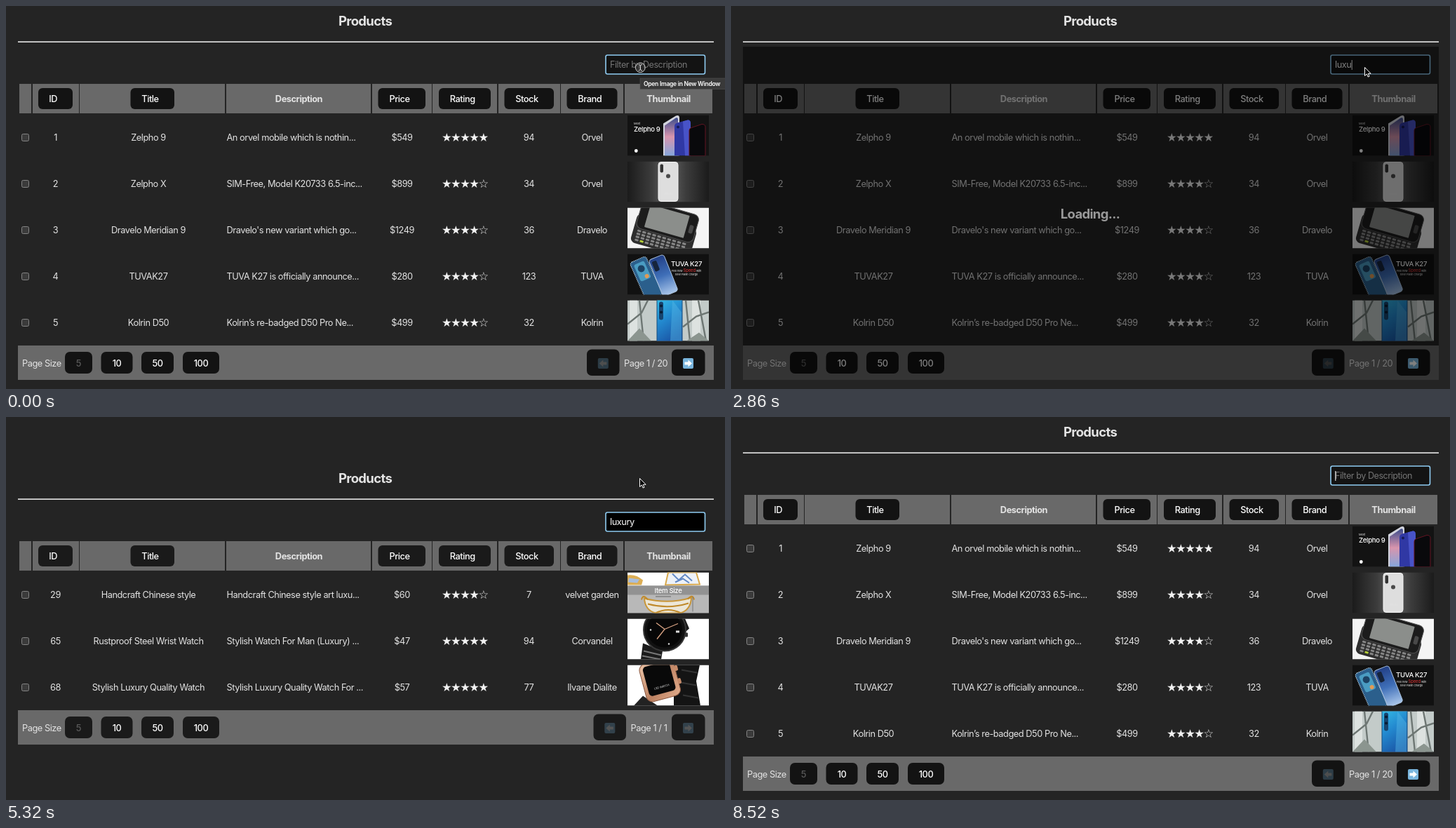
These frames come from a looping animation (1025x546 px, 8630 ms). An HTML page:

```html
<!DOCTYPE html>
<html lang="en">
<head>
<meta charset="utf-8">
<title>Products</title>
<style>
  html, body { margin: 0; width: 100%; height: 100%; overflow: hidden; background: #242424; }
  svg { display: block; }
  #stage { width: 100vw; height: 100vh; }
  text { font: 12.8px Inter, Roboto, sans-serif; letter-spacing: -.036em; fill: #e3e3e3; white-space: pre; }
  .mid { text-anchor: middle; }
  .button { font-weight: 500; fill: #fff; }
  .bold { font-weight: 700; }
  .title { font-size: 18.5px; font-weight: 700; }
  .off { fill: #5a5a5a; font-weight: 500; }
  .stars { font: 16.4px "DejaVu Sans", sans-serif; letter-spacing: -1.55px; fill: #f2f2f2; }
  .tip { font-size: 8.6px; font-weight: 600; fill: #fff; }
  .hint { font-size: 12.6px; fill: #757575; }
  .typed { fill: #fff; }
  .tiny { font-size: 4px; }
  .logo-text { font-size: 9.6px; font-weight: 500; fill: #fff; }
</style>
</head>
<body>
<svg id="stage" viewBox="0 0 1025 546" preserveAspectRatio="none">
  <defs>
    <linearGradient id="steel">
      <stop stop-color="#1b1b1b"/><stop offset=".3" stop-color="#3c3c3c"/>
      <stop offset=".5" stop-color="#626262"/><stop offset=".72" stop-color="#3c3c3c"/>
      <stop offset="1" stop-color="#1b1b1b"/>
    </linearGradient>
    <linearGradient id="sea" x2=".4" y2="1">
      <stop stop-color="#36c0ea"/><stop offset=".5" stop-color="#2389cf"/><stop offset="1" stop-color="#1a55a5"/>
    </linearGradient>
    <linearGradient id="dusk" x2="0" y2="1">
      <stop stop-color="#223f86"/><stop offset=".5" stop-color="#3f6fb8"/><stop offset="1" stop-color="#a9c6ea"/>
    </linearGradient>
    <linearGradient id="dawn" x2="0" y2="1">
      <stop stop-color="#3c4c8c"/><stop offset=".5" stop-color="#d895ad"/><stop offset="1" stop-color="#85a6dc"/>
    </linearGradient>
    <linearGradient id="gold" x2="1" y2="1">
      <stop stop-color="#f0c8ab"/><stop offset=".5" stop-color="#bb8060"/><stop offset="1" stop-color="#e2ad8d"/>
    </linearGradient>
  </defs>
  <g id="app"></g>
  <g id="tip">
    <rect x="904" y="103" width="122" height="15.5" fill="#393939" stroke="#555" stroke-width=".6"/>
    <text class="tip" x="909" y="113.6">Open Image in New Window</text>
  </g>
  <g id="ring" fill="none" stroke="#d8d8d8">
    <circle cx="904.3" cy="87.8" r="6.8" fill="#333" fill-opacity=".6"/>
    <path d="M901.5 83.5q2.8 0 2.8 2v4.5q0 2-2.8 2M907 83.5q-2.7 0-2.7 2v4.5q0 2 2.7 2"/>
  </g>
  <path id="beam" d="M902 82.5q2.3 0 2.3 2v7q0 2-2.3 2M906.6 82.5q-2.3 0-2.3 2v7q0 2 2.3 2" fill="none" stroke="#d8d8d8"/>
  <path id="arrow" d="M0 0V12L2.8 9.4 4.6 13.6 6.5 12.8 4.7 8.8H8.6Z" fill="#000" stroke="#fff"/>
</svg>

<script>
const LOOP = 8630, SHIFT = 66, ROW = 66;
const $ = id => document.getElementById(id);

const rect = (x, y, w, h, fill, r = 0, extra = '') =>
  `<rect x="${x}" y="${y}" width="${w}" height="${h}" rx="${r}" fill="${fill}" ${extra}/>`;
const label = (s, x, y, cls = 'mid') => `<text x="${x}" y="${y}" class="${cls}">${s}</text>`;
const path = (d, fill, extra = '') => `<path d="${d}" fill="${fill}" ${extra}/>`;
const dot = (x, y, r, fill, extra = '') => `<circle cx="${x}" cy="${y}" r="${r}" fill="${fill}" ${extra}/>`;
const turn = (deg, x, y, body) => `<g transform="translate(${x} ${y}) rotate(${deg})">${body}</g>`;
const repeat = (n, f) => Array.from({ length: n }, (_, i) => f(i)).join('');

// Thumbnail drawings, each 116 by 58
const thumbs = {
  trio: () => rect(0, 0, 116, 58, '#131313') +
    label('Meet', 9, 13, 'tiny') + label('Zelpho 9', 9, 23.5, 'logo-text') + dot(12.3, 51, 2.4, '#fff') +
    path('M51 12L69 1Q74-1 74 4V58H51Z', '#d3d5de') + path('M53 15L69 4Q72 3 72 7V58H53Z', 'url(#dawn)') +
    path('M67 16Q67 12 71 11L86 7Q90 7 90 12V58H67Z', '#3038a4') +
    path('M79 9L86 7Q90 7 90 12V58H82Z', '#4853c8') + dot(72, 17, 2, '#171b55') +
    path('M88 22Q88 19 91 18L106 13Q111 13 111 17V58H88Z', '#09090c', 'stroke="#641522"'),

  silver: () => rect(0, 0, 116, 58, 'url(#steel)') +
    rect(44, 1, 28, 56, '#dedede', 4, 'stroke="#f4f4f4"') + rect(46.5, 4, 4.5, 12, '#333', 2) +
    dot(58, 21, 3, '#4a4a4a') + label('model', 58, 47, 'mid tiny'),

  slider: () => rect(0, 0, 116, 58, '#f4f4f4') +
    turn(16, 18, 8,
      rect(-3, 0, 88, 43, '#2e2e2e', 7) +
      repeat(40, i => rect(3 + i % 10 * 7.4, 23 + (i / 10 | 0) * 4.5, 5.4, 3, i === 31 ? '#b5cf38' : '#858585', 1)) +
      rect(-1, -20, 84, 41, '#1c1c1c', 8, 'stroke="#555"') + rect(11, -16, 58, 33, '#8b8e8b', 1) +
      rect(73, -4, 6, 12, '#494949', 2)),

  duo: () => rect(0, 0, 116, 58, '#111') +
    turn(-24, 3, 13,
      rect(0, 0, 25, 60, '#2b5f8c', 4, 'stroke="#c4d4df" stroke-width="1.2" stroke-dasharray="1.2 1.2"') +
      rect(4, 5, 16, 26, '#4a9cc2', 3) + dot(12, 14, 5, '#1c4264') + dot(15, 27, 3, '#e19b55')) +
    turn(-22, 30, 9,
      rect(0, 0, 23, 56, 'url(#dusk)', 4, 'stroke="#a9c1dc"') + rect(3, 4, 7, 15, '#16243c', 2)) +
    label('TUVA K27', 84, 17.5, 'mid logo-text bold') +
    label('Feel new <tspan fill="#e03232" font-size="6">Speed</tspan> with', 84, 25.5, 'mid tiny') +
    label('55W Flash Charge', 84, 30.5, 'mid tiny'),

  blue: () => rect(0, 0, 116, 58, '#c3cbc9') +
    rect(3, 0, 11, 58, '#dde2e0') + rect(92, 0, 12, 58, '#dde2e0') +
    path('M0 34L20 18 29 0M17 0L23 58M83 0L89 58M79 38L98 23 116 17M101 0L112 58', 'none', 'stroke="#6d7673" stroke-width="2.4"') +
    path('M0 58L17 40 34 58ZM84 58L102 46 116 58Z', '#8b958f') +
    rect(42, -4, 36, 68, 'url(#sea)', 4, 'stroke="#164d7c"') +
    path('M64 0L77 17V58H61Z', '#54b7e4', 'opacity=".45"') + rect(45, 2, 6, 26, '#16446f', 3) +
    dot(48, 8, 2, '#071b30') + dot(48, 17, 2, '#071b30'),

  bowl: () => rect(0, 0, 116, 58, '#fff') +
    path('M0 4Q12 2 22 11L20 18H0Z', '#dcae55') + path('M2 8L17 10 14 15 1 14Z', '#a9bedd') +
    path('M58 0H98L103 17 54 18Z', '#edf1f7', 'stroke="#d8a84b" stroke-width="2"') +
    path('M64 2L73 11 82 3 92 12M68 14L79 9 88 15', 'none', 'stroke="#6389c4" stroke-width="2"') +
    rect(0, 19, 116, 39, '#b8b8b8') + rect(0, 19, 116, 13, '#929292') +
    label('Item Size', 58, 29, 'mid logo-text') +
    path('M24 37Q58 46 91 36Q90 54 75 58H40Q25 54 24 37Z', '#ece7d8', 'stroke="#c99638" stroke-width="2"') +
    path('M29 45Q58 53 87 44M40 58Q58 49 76 58M20 39Q22 30 29 39M86 38Q93 30 95 39', 'none', 'stroke="#c08a2b" stroke-width="2"') +
    path('M93 35V56', 'none', 'stroke="#777"') + rect(40, 34, 22, 1, '#666'),

  watch: () => rect(0, 0, 116, 58, '#fff') +
    path('M62 0H82L88 14 76 25ZM22 35L50 46 48 58H19Z', '#1b1b1b') +
    path('M23 46L48 52M21 53L47 58', 'none', 'stroke="#777" stroke-width="2"') +
    dot(53, 16, 30, '#111', 'stroke="#363636" stroke-width="2"') + dot(53, 16, 25, '#070707') +
    path('M53 15L41 6M53 15L72 7M53 15L42 29', 'none', 'stroke="#d7a283" stroke-width="1.3"') +
    dot(33, 16, 1.2, '#ddd') + dot(59, 36, 1.2, '#ddd') + rect(69, 17, 5, 3, '#ddd') + rect(82, 20, 4, 6, '#333', 1),

  digital: () => rect(0, 0, 116, 58, '#fff') +
    path('M66 0H103L98 23 104 58H66Z', '#141414') + path('M77 7L99 11M76 25L98 29M79 43L101 47', 'none', 'stroke="#333" stroke-width="2"') +
    path('M9 58L22 44 43 58Z', '#222') +
    turn(-15, 17, 9,
      rect(0, -8, 50, 55, 'url(#gold)', 9, 'stroke="#8a573f"') + rect(5, -4, 39, 43, '#090909', 5) +
      rect(49, 5, 5, 8, '#c78b69', 2) + rect(49, 24, 5, 8, '#c78b69', 2) +
      label('LED WATCH', 25, 31, 'mid tiny'))
};

const catalog = [
  [1, 'Zelpho 9', 'An orvel mobile which is nothin...', 549, 5, 94, 'Orvel', 'trio'],
  [2, 'Zelpho X', 'SIM-Free, Model K20733 6.5-inc...', 899, 4, 34, 'Orvel', 'silver'],
  [3, 'Dravelo Meridian 9', "Dravelo's new variant which go...", 1249, 4, 36, 'Dravelo', 'slider'],
  [4, 'TUVAK27', 'TUVA K27 is officially announce...', 280, 4, 123, 'TUVA', 'duo'],
  [5, 'Kolrin D50', 'Kolrin’s re-badged D50 Pro Ne...', 499, 4, 32, 'Kolrin', 'blue']
];
const matches = [
  [29, 'Handcraft Chinese style', 'Handcraft Chinese style art luxu...', 60, 4, 7, 'velvet garden', 'bowl'],
  [65, 'Rustproof Steel Wrist Watch', 'Stylish Watch For Man (Luxury) ...', 47, 5, 94, 'Corvandel', 'watch'],
  [68, 'Stylish Luxury Quality Watch', 'Stylish Luxury Quality Watch For ...', 57, 5, 77, 'Ilvane Dialite', 'digital']
];

function row([id, title, text, price, stars, stock, brand, thumb], i) {
  const y = 192 + i * ROW;
  return rect(22.5, y - 9.5, 10, 10, '#3b3b3b', 2, 'stroke="#858585"') +
    label(id, 70.5, y) + label(title, 203, y) + label(text, 314.5, y, '') +
    label('$' + price, 564.5, y) + label('★'.repeat(stars) + '☆'.repeat(5 - stars), 653.8, y + 1.2, 'mid stars') +
    label(stock, 745.5, y) + label(brand, 835.5, y) +
    `<svg x="886" y="${y - 36.5}" width="116" height="58" viewBox="0 0 116 58">${thumbs[thumb]()}</svg>`;
}

function arrowIcon(x, y, dir, on) {
  return `<g transform="translate(${x} ${y}) scale(${dir} 1)" opacity="${on ? 1 : .25}">` +
    rect(-7.5, -7.5, 15, 15, '#79b5dd', 2) + path('M5.5 0L0-5V-2H-5V2H0V5Z', '#fff') + '</g>';
}

function table(rows, fill, pages) {
  const end = 154 + rows.length * ROW, mid = end + 25, more = pages > 1;
  const prev = more ? 828 : 837.5;
  const cells = [[19, 17], [38, 66], [105, 207], [314, 206], [522, 85], [608, 92], [702, 88], [791, 89], [882, 125]];
  const heads = [['ID', 46, 49], ['Title', 177.5, 62.5], ['Price', 530.5, 67.5], ['Rating', 617, 74],
    ['Stock', 710.5, 70.5], ['Brand', 799.5, 72]];
  const sizes = [[5, 84, 39], [10, 135.5, 45], [50, 193, 46], [100, 252, 52]];
  return cells.map(([x, w]) => rect(x, 111, w, 42, '#696969')).join('') +
    heads.map(([s, x, w]) => rect(x, 117, w, 30, fill, 6) + label(s, x + w / 2 - 3.3, 137, 'mid button')).join('') +
    label('Description', 417.5, 137, 'mid bold') + label('Thumbnail', 944.5, 137, 'mid bold') +
    rows.map(row).join('') +
    rect(17, end, 992, 49, '#696969') + label('Page Size', 23, mid + 4.7, '') +
    sizes.map(([n, x, w]) => rect(x, mid - 16, w, 31, fill, 7) +
      label(n, x + w / 2, mid + 4.5, n === 5 ? 'mid off' : 'mid button')).join('') +
    rect(prev, mid - 19.5, 46.5, 37.5, fill, 7) + arrowIcon(prev + 23.3, mid + .5, -1, false) +
    rect(949, mid - 19.5, 47.5, 37.5, fill, 7) + arrowIcon(972.5, mid + .5, 1, more) +
    label('Page 1 / ' + pages, prev + 53, mid + 5.2, '');
}

$('app').innerHTML =
  label('Products', 512, 28, 'mid title') + rect(17, 50.3, 992, 1.7, '#dcdcdc') +
  rect(855, 70, 141.5, 27, '', 2.5, 'id="field" stroke="#8fccf2" stroke-width="1.6"') +
  '<text id="hint" class="hint" x="861" y="88">Filter by Description</text>' +
  '<text id="typed" class="typed" x="861" y="88"></text>' +
  '<rect id="caret" y="77" width="1" height="14" fill="#fff"/>' +
  `<g id="all">${table(catalog, '#131313', 20)}</g><g id="found">${table(matches, '#1a1a1a', 1)}</g>` +
  '<g id="busy"><rect id="shade" x="17" y="58" width="992" fill="#000" fill-opacity=".5"/>' +
  '<text id="wait" class="mid title" x="512" style="fill:#999">Loading...</text></g>';

// Each track lists [start time, value]; values hold until the next entry
const tracks = {
  text: [[0, ''], [1020, 'l'], [2380, 'lu'], [2560, 'lux'], [2860, 'luxu'], [4460, 'luxur'], [4550, 'luxury'], [6810, '']],
  caret: [0, 360, 840, 1020, 1490, 1790, 2030, 2380, 3840, 4370, 5020, 5490, 6030, 6510, 6990, 8400].map((t, i) => [t, i % 2]),
  busy: [0, 1320, 1790, 2860, 3340, 4840, 5320, 7110, 7530].map((t, i) => [t, i % 2]),
  found: [[0, 0], [3340, 1], [7530, 0]],
  pointer: [[0, 'ring'], [60, 'beam'], [1020, 'arrow'], [8350, '']]
};
const at = (name, t) => tracks[name].findLast(([start]) => start <= t)[1];
const show = (id, on) => { $(id).style.display = on ? '' : 'none'; };

function draw(now) {
  const t = now % LOOP, found = at('found', t), text = at('text', t), pointer = at('pointer', t);
  $('app').setAttribute('transform', `translate(0 ${found ? SHIFT : 0})`);
  $('field').setAttribute('fill', found ? '#000' : '#131313');
  show('all', !found);
  show('found', found);

  if ($('typed').textContent !== text) $('typed').textContent = text;
  show('hint', !text);
  show('caret', at('caret', t));
  $('caret').setAttribute('x', 861.3 + (text ? $('typed').getComputedTextLength() : 0));

  const height = found ? 343 : 475;
  show('busy', at('busy', t));
  $('shade').setAttribute('height', height);
  $('wait').setAttribute('y', 58 + height / 2 + 7);

  for (const id of ['ring', 'beam', 'arrow']) show(id, id === pointer);
  show('tip', t < 1020);
  const p = Math.min(1, Math.max(0, (t - 7530) / 820)), ease = p * p * (3 - 2 * p);
  $('arrow').setAttribute('transform', `translate(${903.5 + 32 * ease} ${87.5 + 470 * ease})`);
}

const begin = performance.now();
function tick() {
  draw(performance.now() - begin);
  requestAnimationFrame(tick);
}
tick();
</script>
</body>
</html>
```
